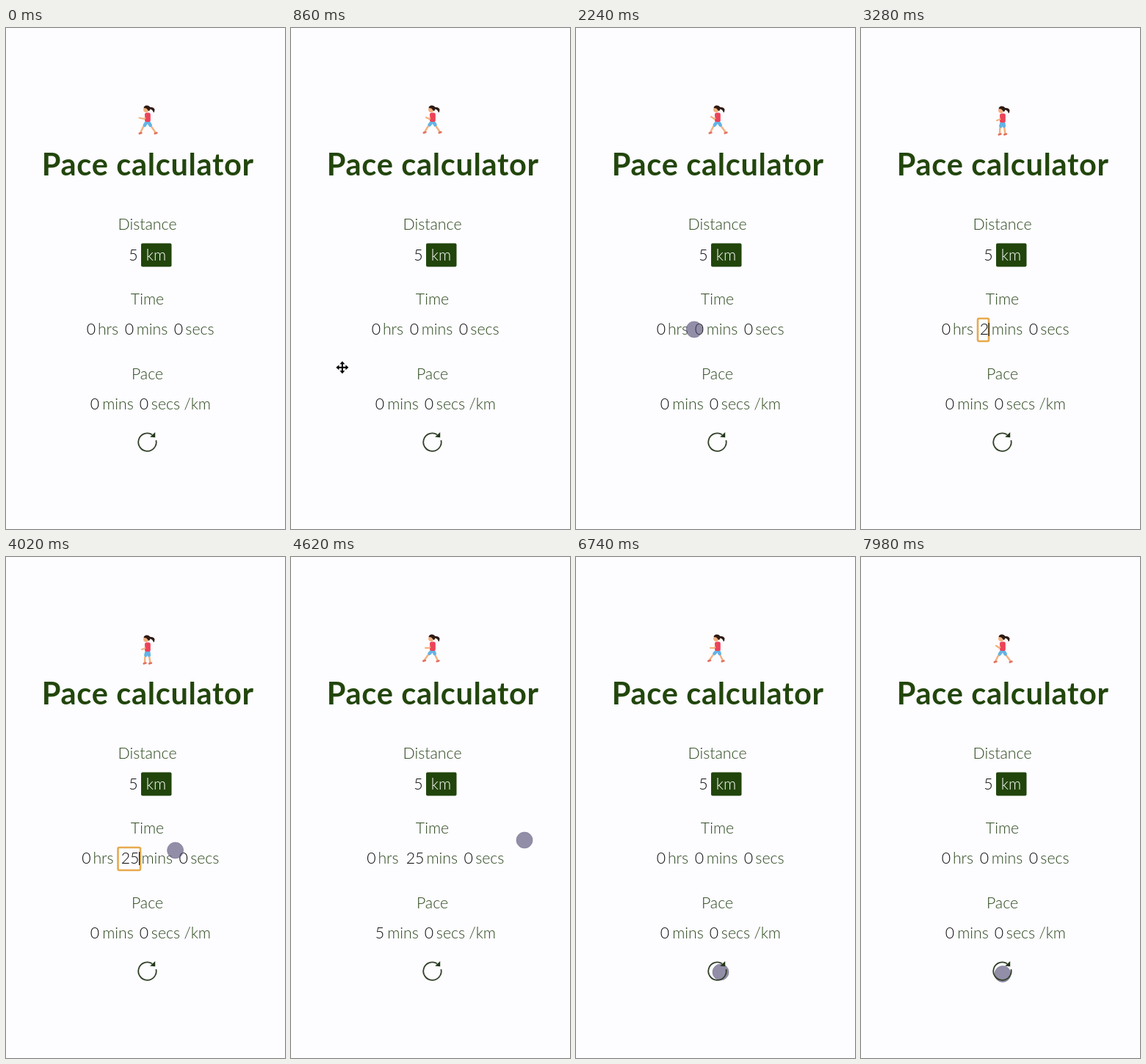
An HTML page for the animation above (8000 ms loop, 380 by 683 pixels).

```html
<!DOCTYPE html>
<html lang="en">
<head>
<meta charset="utf-8">
<title>Pace calculator</title>
<style>
  html, body { margin: 0; width: 100%; height: 100%; overflow: hidden; background: #fdfcff; }
  svg { display: block; width: 100%; height: 100%; }
  text { font: 300 21.3px Lato, "Open Sans", sans-serif; text-anchor: middle; fill: #2b481c; }
  .title { font-size: 41.5px; font-weight: 700; letter-spacing: .7px; fill: #22460c; }
  .value { fill: #0a0a0a; }
  .limb { fill: none; stroke-linecap: round; stroke-linejoin: round; }
</style>
</head>
<body>
<svg viewBox="0 0 380 683">
  <g id="runner"></g>
  <text class="title" x="193.3" y="201">Pace calculator</text>

  <text x="192.5" y="275">Distance</text>
  <text class="value" x="173.5" y="317">5</text>
  <rect x="184" y="293.5" width="41.5" height="32" rx="2" fill="#22450c"/>
  <text x="204.5" y="317" style="fill:#fff">km</text>

  <text x="192.5" y="377">Time</text>
  <g id="hours">
    <text class="value" x="116" y="418">0</text><text x="139" y="418">hrs</text>
  </g>
  <text id="minutes" class="value" y="418"></text>
  <g id="seconds">
    <text x="199" y="418">mins</text>
    <text class="value" x="235" y="418">0</text><text x="264" y="418">secs</text>
  </g>
  <g id="focus">
    <rect id="ring" y="396" height="31" rx="2" fill="none" stroke="#e7aa4e" stroke-width="2.6"/>
    <rect id="caret" y="402" width="1.2" height="18" fill="#111"/>
  </g>

  <text x="192.5" y="479">Pace</text>
  <text id="pace" class="value" x="121" y="520"></text>
  <text x="152.5" y="520">mins</text>
  <text class="value" x="188" y="520">0</text>
  <text x="217.5" y="520">secs</text>
  <text x="260.7" y="520">/km</text>

  <circle id="dot" r="11" fill="rgb(80,75,115)" fill-opacity=".62" stroke="#77748f" stroke-width=".6"/>
  <g>
    <path d="M204.4 562A12.2 12.2 0 1 1 199 554.3" fill="none" stroke="#33422a" stroke-width="1.8"/>
    <path d="M203.2 551V558.2L196.2 557.4Z" fill="#22381a"/>
  </g>
  <g id="cross">
    <path d="M-6 0H6M0-6V6" stroke="#000" stroke-width="2"/>
    <path d="M0-8.5L3.5-4.5H-3.5ZM0 8.5L3.5 4.5H-3.5ZM-8.5 0L-4.5-3.5V3.5ZM8.5 0L4.5-3.5V3.5Z"/>
  </g>
</svg>

<script>
const LOOP = 8000, STRIDE = 720;
const FOCUS = 2520, FIRST_DIGIT = 3000, SECOND_DIGIT = 3500, BLUR = 4300, RESET = 6550;
const el = id => document.getElementById(id);
const show = (id, on) => el(id).setAttribute("visibility", on ? "visible" : "hidden");
const place = (id, x, y = 0) => el(id).setAttribute("transform", `translate(${x} ${y})`);

// Pointer stops: time, x, y
const stops = [
  [60, 390, 590], [480, 220, 545], [820, 75, 470], [920, 61, 450],
  [1200, 340, 430], [1460, 185, 434], [1700, 98, 420], [2200, 161, 411],
  [3850, 161, 411], [4220, 318, 386], [5760, 318, 386], [5880, 306, 397],
  [6450, 197, 566], [7400, 197, 566], [7700, 193, 568.5], [LOOP, 193, 568.5]
];

function pointerAt(t) {
  const i = Math.max(1, stops.findIndex(s => s[0] > t));
  const [t0, x0, y0] = stops[i - 1], [t1, x1, y1] = stops[i];
  const u = Math.min(1, Math.max(0, (t - t0) / (t1 - t0)));
  const e = u * u * (3 - 2 * u);
  return [x0 + (x1 - x0) * e, y0 + (y1 - y0) * e];
}

const poses = [
  { front: [183, 142.5], back: [204, 142.5], hand: [184, 121], drop: 0 },
  { front: [182, 142], back: [203, 142], hand: [184, 122], drop: 0 },
  { front: [181.5, 141], back: [200, 141.5], hand: [183, 124], drop: 0 },
  { front: [189, 144.5], back: [196.5, 144.5], hand: [185, 125], drop: 1 },
  { front: [187, 144], back: [201, 143], hand: [183, 123], drop: 0.5 },
  { front: [183, 143], back: [204, 143], hand: [181.5, 122.5], drop: 0 }
];

const SKIN = "#f2b07f", SHORTS = "#63b3e4", SHIRT = "#ec4258", SHOE = "#e4705f", HAIR = "#2e1b14";
const limb = (color, width, ...points) =>
  `<polyline class="limb" stroke="${color}" stroke-width="${width}" points="${points.join(" ")}"/>`;

function leg(hip, foot, forward) {
  const knee = [(hip[0] + foot[0]) / 2 - (forward ? 1 : 0), (hip[1] + foot[1]) / 2 + 0.3];
  return limb(SKIN, 2.4, hip, knee, foot)
    + limb(SHORTS, 4.6, hip, [(hip[0] + knee[0]) / 2, knee[1] - 3.5])
    + limb(SHOE, 2.6, [foot[0] - 1.2, foot[1] + 0.8], [foot[0] + 1.4, foot[1]]);
}

function runner({ front, back, hand, drop }) {
  const y = v => v + drop;
  return leg([194.2, y(128.5)], back, false)
    + leg([191.5, y(128.5)], front, true)
    + `<rect x="189" y="${y(115.5)}" width="7.8" height="12.5" rx="2.5" fill="${SHIRT}"/>`
    + limb(SKIN, 2.2, [192.5, y(119)], [188.5, y(124)], [hand[0], y(hand[1])])
    + limb(SHIRT, 2.8, [193, y(118.5)], [191, y(121.5)])
    + `<circle cx="190.8" cy="${y(111.2)}" r="3.7" fill="${SKIN}"/>`
    + `<path fill="${HAIR}" transform="translate(0 ${drop})"
        d="M187.500 109Q188 105.500 192 105.500Q195 105.500 196.500 108Q201 107.500 202.500 111Q202.500 114 201 115.500Q200 111.500 196.500 110.500Q196 113 194 113Q192.500 110.500 191 109.500Z"/>`;
}

function draw(t) {
  const phase = ((t - 10 + STRIDE) % STRIDE) / STRIDE;
  el("runner").innerHTML = runner(poses[Math.floor(phase * poses.length)]);

  const entered = t >= FIRST_DIGIT && t < RESET;
  const wide = t >= SECOND_DIGIT && t < RESET;
  el("minutes").textContent = wide ? "25" : entered ? "2" : "0";
  el("minutes").setAttribute("x", wide ? 169 : 168);
  el("pace").textContent = t >= BLUR && t < RESET ? "5" : "0";
  place("hours", wide ? -6.5 : 0);
  place("seconds", wide ? 6.8 : 0);

  show("focus", t >= FOCUS && t < BLUR);
  el("ring").setAttribute("x", wide ? 152.5 : 159);
  el("ring").setAttribute("width", wide ? 30.5 : 15);
  el("caret").setAttribute("x", wide ? 181 : 173.5);

  const [x, y] = pointerAt(t);
  const typing = t >= FIRST_DIGIT && t < 3850;
  place("dot", x, y);
  place("cross", x, y);
  show("cross", t > 60 && t < 1800);
  show("dot", t >= 1800 && !typing);
}

function tick(now) {
  draw(now % LOOP);
  requestAnimationFrame(tick);
}
draw(0);
requestAnimationFrame(tick);
</script>
</body>
</html>
```
